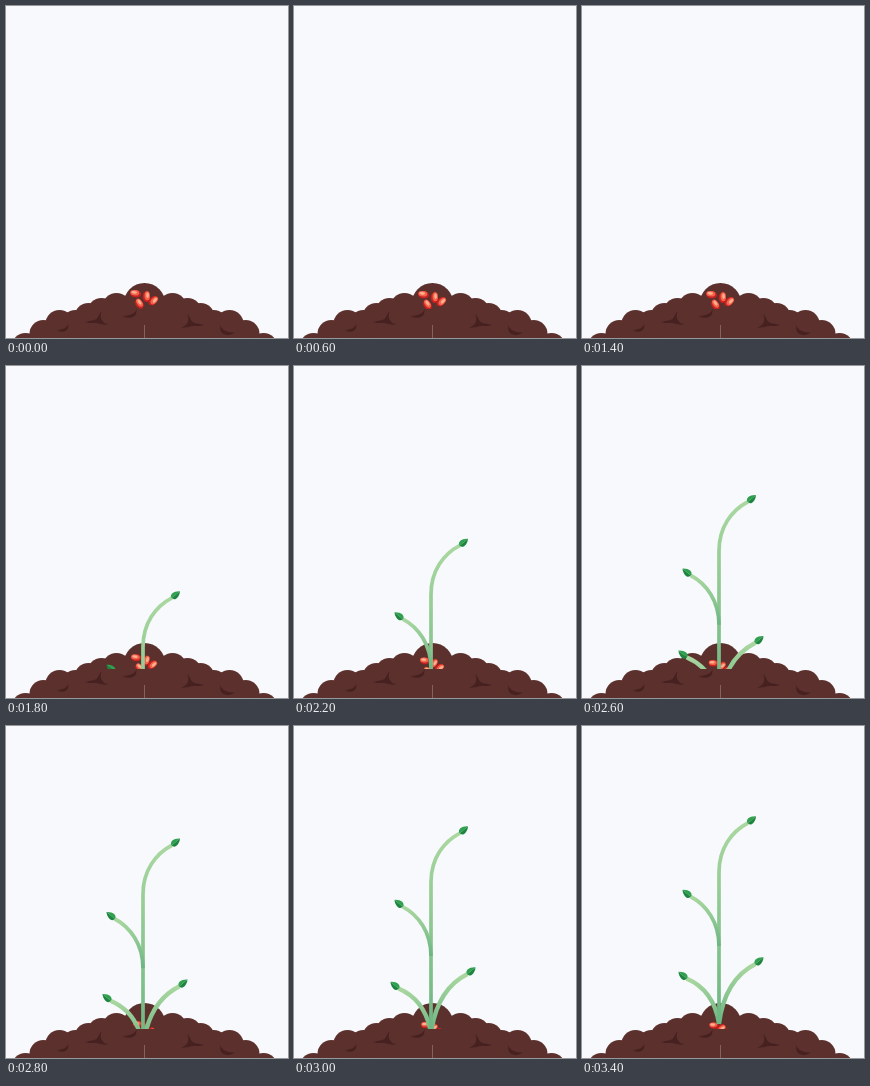
Recreate the animation shown at these times as an HTML page with a canvas. Size 282x332 px, loop 4 s.

```html
<!DOCTYPE html>
<html lang="en">
<head>
<meta charset="utf-8">
<title>Sprouting plant</title>
<style>
  html, body { margin: 0; width: 100%; height: 100%; overflow: hidden; background: #f7f9fc; }
  canvas { display: block; width: 282px; height: 332px; }
</style>
</head>
<body>
<canvas id="stage" width="282" height="332"></canvas>
<script>
const ctx = document.getElementById('stage').getContext('2d');
const W = 282, H = 332, LOOP = 4000, STEP = 100;
const SPROUT = 1400, GROWN = 3400;
const MID = 138.5, GROUND = 303, ROOT = { x: 137, y: 298 };
const lerp = (a, b, k) => a + (b - a) * k;

// Distance the plant still has to rise
const depth = t => 148.5 * (1 + Math.cos(Math.PI * Math.min(t, GROWN) / GROWN));

// Run a drawing in its own coordinates
function at(x, y, angle, sx, sy, paint) {
  ctx.save();
  ctx.translate(x, y);
  ctx.rotate(angle);
  ctx.scale(sx, sy);
  paint();
  ctx.restore();
}

function ellipse(x, y, rx, ry, color) {
  ctx.fillStyle = color;
  ctx.beginPath();
  ctx.ellipse(x, y, rx, ry, 0, 0, Math.PI * 2);
  ctx.fill();
}

// Mound: crest points as distance from the middle and height, mirrored
const crest = [[28, 287], [43, 292], [56, 297], [69, 304], [85, 304], [101, 314], [119, 327]];
const crescent = new Path2D('M6-5C6 0 1 4-6 4C-2 7 4 6 5 2Z');
const fork = new Path2D('M6-7C2-4 3 1-2 2L-11 4C-6 6 0 4 4 6L12 7C5 4 3-1 6-7Z');

function drawShade(shape, x, y, sx, sy) {
  at(x, y, 0, sx, sy, () => ctx.fill(shape));
}

function drawSoil() {
  const color = '#5c312d', r = 14;
  ellipse(MID, 298, 21, 21, color);
  for (const side of [-1, 1]) {
    ctx.beginPath();
    ctx.moveTo(MID, 290);
    for (const [d, top] of crest) ctx.lineTo(MID + side * d, top + r);
    ctx.lineTo(MID, H + 20);
    ctx.fill();
    for (const [d, top] of crest) ellipse(MID + side * d, top + r, r, r, color);
  }
  ctx.fillStyle = '#46211f';
  drawShade(crescent, 57, 320, 1, 1);
  drawShade(crescent, 124, 306, 1.2, 1);
  drawShade(crescent, 221, 322, -1.3, 1.2);
  drawShade(fork, 90, 312, 1, 1);
  drawShade(fork, 187, 315, -1, 1);
}

// Seeds: x, y, angle
const seeds = [[133.5, 297, 0.95], [148, 294.5, 2.35], [141, 290, 1.55], [129, 287, 0.1]];

function drawSeed([x, y, angle], settle, sink) {
  const flat = x < ROOT.x ? 0 : 2.6;
  const size = lerp(1, 0.85, sink);
  at(lerp(x, ROOT.x, 0.3 * sink), y + settle + 11 * sink, lerp(angle, flat, sink), size, size, () => {
    ellipse(0.7, 0.6, 5.4, 3.7, '#c9211f');
    ellipse(-0.2, -0.2, 4.5, 2.7, '#f4644c');
    ellipse(-0.8, -0.6, 2.8, 1.4, '#ffb08f');
  });
}

function drawLeaf(x, y, side) {
  at(x, y, 0, side, 1, () => {
    ctx.rotate(-0.69);
    for (const [half, color] of [[-1, '#2fa04e'], [1, '#1d853f']]) {
      ctx.fillStyle = color;
      ctx.beginPath();
      ctx.moveTo(-0.5, 0);
      ctx.bezierCurveTo(0, half * 4.6, 6, half * 4.2, 10.4, 0);
      ctx.fill();
    }
  });
}

// A stem rises from its base and bends outward to a leaf at its tip
function drawStem(x, y, base, bend, lean, width) {
  const w = x - ROOT.x, h = bend - y;
  const color = ctx.createLinearGradient(0, y, 0, base);
  color.addColorStop(0, '#aad7a0');
  color.addColorStop(1, '#6cb582');
  ctx.strokeStyle = color;
  ctx.lineWidth = width;
  ctx.beginPath();
  ctx.moveTo(ROOT.x, base);
  ctx.lineTo(ROOT.x, bend);
  ctx.bezierCurveTo(ROOT.x + lean * w, bend - 0.48 * h, ROOT.x + 0.44 * w, y + 0.17 * h, x, y);
  ctx.stroke();
  drawLeaf(x, y, Math.sign(w));
}

function drawPlant(offset) {
  at(0, offset, 0, 1, 1, () => {
    drawStem(104.5, 252.5, ROOT.y, ROOT.y, 0.1, 4.3);
    drawStem(173.5, 238, ROOT.y, ROOT.y, 0.1, 4.3);
    drawStem(166, 97, ROOT.y, 146, 0, 3.7);
    drawStem(108.5, 170.5, 220, 220, 0, 3.7);
  });
}

function draw(time) {
  const t = Math.floor((time % LOOP) / STEP) * STEP;
  const settle = Math.min(1, t / 600);
  const offset = depth(t);
  const sink = Math.max(0, 1 - offset / depth(SPROUT));

  ctx.fillStyle = '#f7f9fc';
  ctx.fillRect(0, 0, W, H);
  drawSoil();

  ctx.save();
  ctx.beginPath();
  ctx.rect(0, 0, W, GROUND);
  ctx.clip();
  for (const seed of seeds) drawSeed(seed, settle, sink);
  if (t > SPROUT) drawPlant(offset);
  ctx.restore();
}

const start = performance.now();
function tick() {
  draw(performance.now() - start);
  requestAnimationFrame(tick);
}
tick();
</script>
</body>
</html>
```
